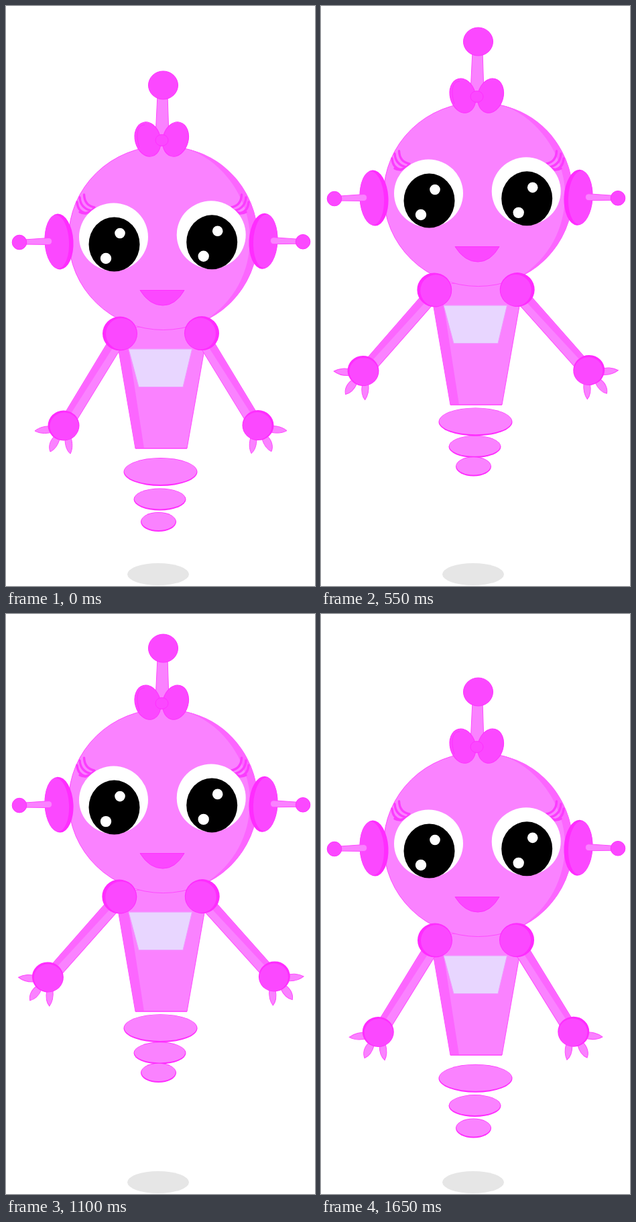
An HTML page for the animation above (1.7 s loop, 461 by 864 pixels).

```html
<!DOCTYPE html>
<html lang="en">
<head>
<meta charset="utf-8">
<title>Floating robot</title>
<style>
  html, body { margin: 0; width: 100%; height: 100%; overflow: hidden; background: #fff; }
  svg { display: block; width: 461px; height: 864px; }
  .light { fill: #fa82ff; stroke: #ff4aff; }
  .deep { fill: #fb48ff; stroke: #ff30ff; }
  .shade { fill: #fc66ff; }
  .rim { fill: #ff2cff; }
  .lash { fill: none; stroke: #fb3cff; stroke-width: 3.4; stroke-linecap: round; }
</style>
</head>
<body>
<svg viewBox="0 0 461 864">
  <defs>
    <g id="arm">
      <path class="light" d="M151 502 L88 606 L105 618 L170 512Z"/>
      <path class="shade" d="M152 502 L89 606 L95 610 L162 505Z"/>
      <path class="light" d="M72 627 C60 624 49 628 43 633 C52 638 63 637 72 634Z"/>
      <path class="light" d="M72 641 C65 648 63 657 66 664 C73 661 78 653 80 645Z"/>
      <path class="light" d="M88 645 C88 655 91 663 96 667 C100 659 99 650 97 643Z"/>
      <ellipse class="rim" cx="86" cy="625" rx="23.5" ry="22.5"/>
      <ellipse fill="#fb48ff" cx="87" cy="626" rx="21.5" ry="20.5"/>
      <ellipse class="rim" cx="170" cy="488" rx="26" ry="25.5"/>
      <ellipse fill="#fb48ff" cx="172" cy="488.5" rx="23" ry="23.5"/>
    </g>
    <g id="ear">
      <g transform="rotate(-3 79 351)">
        <ellipse class="rim" cx="79" cy="351" rx="21.5" ry="41.5"/>
        <ellipse fill="#fb48ff" cx="76" cy="351" rx="18" ry="40"/>
      </g>
      <path class="light" d="M28 348 L64 345.5 Q68.500 346 68.500 350.500 Q68.500 355 64 355.500 L28 355Z"/>
      <circle class="deep" cx="20" cy="352" r="10.800"/>
    </g>
    <g id="eye">
      <ellipse fill="#fff" cx="160.500" cy="344" rx="51.500" ry="50.500"/>
      <ellipse cx="161.500" cy="355" rx="38" ry="40.500"/>
      <circle fill="#fff" cx="170" cy="338.500" r="7.800"/>
      <circle fill="#fff" cx="149" cy="376" r="8.200"/>
    </g>
    <g id="lashes" class="lash">
      <path d="M116.500 281 Q117 297 132 300"/>
      <path d="M110 285 Q111 301 127 305"/>
      <path d="M106 292 Q107 306 119 309"/>
      <path d="M110 307 Q120 312 131 302"/>
    </g>
  </defs>

  <ellipse fill="#e6e6e6" cx="227" cy="846.500" rx="46" ry="16.500"/>

  <g id="body">
    <path class="light" d="M162 478 H302 L270 659 H193Z"/>
    <path class="shade" d="M162 478 H178 L206 659 H193Z"/>
    <path d="M193 659 H270" stroke="#ff3cff"/>
    <path fill="#e8d6ff" stroke="#ef9cff" d="M183 511 H277.500 L264 567.500 H198Z"/>

    <path class="light" d="M226 132 H241 L243 195 H223Z"/>
    <ellipse class="deep" cx="234.500" cy="118" rx="22" ry="21"/>
    <ellipse class="light" cx="234.500" cy="345.500" rx="141" ry="137"/>
    <path class="shade" d="M270 213 C330 225 375.500 280 375.500 345.500 C375.500 400 343 448 298 468 C340 440 364 398 364 345 C364 290 325 230 270 213Z"/>

    <g class="deep">
      <ellipse cx="211.500" cy="198.500" rx="19" ry="26" transform="rotate(-15 211.500 198.500)"/>
      <ellipse cx="253" cy="198.500" rx="19" ry="26" transform="rotate(15 253 198.500)"/>
      <path fill="none" d="M207 177 C194 177 194 195 199 211"/>
      <ellipse cx="232.500" cy="200" rx="9.500" ry="8.500"/>
    </g>

    <use href="#ear"/>
    <use href="#ear" transform="translate(463 -.800) scale(-1 1)"/>
    <use href="#lashes"/>
    <use href="#lashes" transform="translate(468 0) scale(-1 1)"/>
    <use href="#eye"/>
    <use href="#eye" transform="translate(145.700 -3.200)"/>
    <path class="deep" d="M200 423.500 H266 Q253 446 234 446 Q214 446 200 423.500Z"/>

    <use href="#arm" id="left"/>
    <g transform="translate(462 -.400) scale(-1 1)"><use href="#arm" id="right"/></g>
  </g>

  <g class="ring">
    <ellipse class="rim" cx="230.500" cy="694" rx="55" ry="21"/>
    <ellipse fill="#fa82ff" cx="230.500" cy="693.300" rx="54" ry="19.600"/>
  </g>
  <g class="ring">
    <ellipse class="rim" cx="229.500" cy="735" rx="39" ry="16.500"/>
    <ellipse fill="#fa82ff" cx="229.500" cy="734.300" rx="38" ry="15.100"/>
  </g>
  <g class="ring">
    <ellipse class="rim" cx="227.500" cy="768.500" rx="26.500" ry="14.500"/>
    <ellipse fill="#fa82ff" cx="227.500" cy="767.800" rx="25.500" ry="13.100"/>
  </g>
</svg>
<script>
  const LOOP = 1700, STEP = 50, RISE = 2500 / 3;
  const [body, left, right] = ['body', 'left', 'right'].map(id => document.getElementById(id));
  const rings = [...document.querySelectorAll('.ring')];
  const ringLift = [113, 119, 125];

  const lift = (el, y) => el.setAttribute('transform', `translate(0 ${-y})`);
  const swing = (el, angle) => el.setAttribute('transform', `rotate(${angle} 170 484)`);

  function draw(now) {
    const t = Math.floor(now % LOOP / STEP) * STEP;
    const p = 1 - Math.abs(t / RISE - 1); // linear rise and fall
    lift(body, 98.4 * p);
    rings.forEach((ring, i) => lift(ring, ringLift[i] * p));
    swing(left, 15 * p);
    swing(right, 15.5 * p);
    requestAnimationFrame(() => draw(performance.now()));
  }
  draw(performance.now());
</script>
</body>
</html>
```
